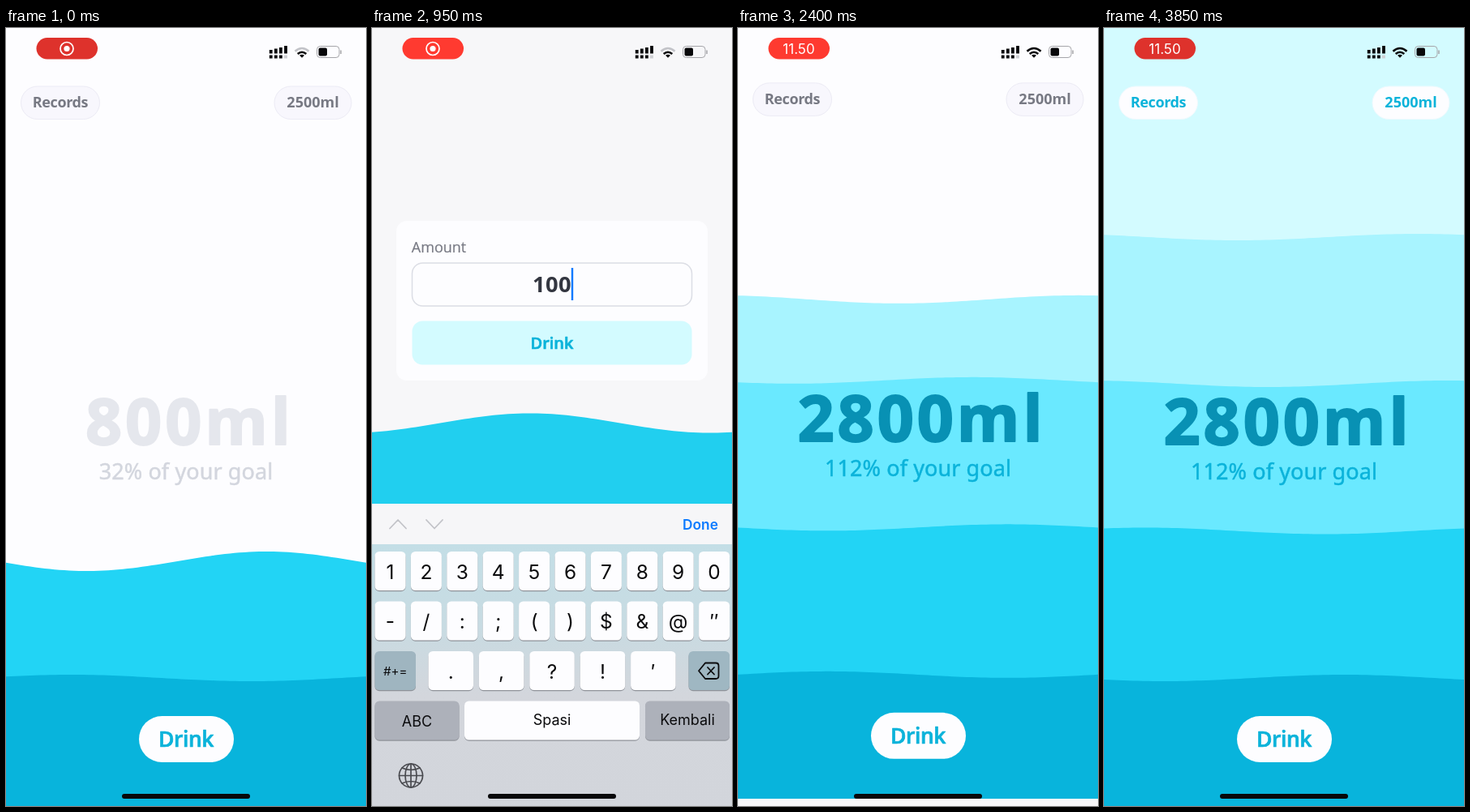
An HTML page for the animation above (3.9 s loop, 444 px wide and 960 px high).

```html
<!DOCTYPE html>
<html lang="en">
<head>
<meta charset="utf-8">
<title>Water tracker</title>
<style>
  html, body { margin: 0; width: 100%; height: 100%; overflow: hidden; background: #fdfdff; }
  svg { display: block; width: 444px; height: 960px; font-family: "Open Sans", "Noto Sans", sans-serif; }
  text { text-anchor: middle; stroke-linejoin: round; }
  .round { font-weight: 600; stroke: currentColor; fill: currentColor; stroke-width: .7; }
  .pill rect { fill: #f8f7fd; stroke: #ecebf5; }
  .pill text { fill: #777983; font-size: 18px; font-weight: 700; }
  .full .pill rect { fill: #fdfdff; stroke: #eefafe; }
  .full .pill text { fill: #0bb3da; }
  #total { font-size: 79px; font-weight: 700; letter-spacing: 4px; stroke-width: 2; color: #e5e7ed; }
  #share { font: 500 27px "Noto Sans", "Open Sans", sans-serif; letter-spacing: .1px; stroke-width: .5; color: #d3d6de; }
  .after #total { color: #0891b4; }
  .after #share { color: #0bb3da; }
  #keyboard, #clock { font-family: Inter, "Liberation Sans", sans-serif; }
  #keys text { font-size: 24.5px; fill: #0b0b0d; }
  #keys .word { font-size: 18px; }
  #keys .small { font-size: 15px; }
  .line { fill: none; stroke-linecap: round; stroke-linejoin: round; }
  #submit { fill: #d3fbff; }
  #submitText { color: #0bb3da; }
  #rim { fill: #a9c0c7; stroke: #cfd1d8; stroke-width: 1.4; visibility: hidden; }
  .pressed #rim { visibility: visible; }
  .pressed #submitText { color: #0892b4; }
</style>
</head>
<body>
<svg id="stage" viewBox="0 0 444 960">
  <defs>
    <linearGradient id="keysBg" x1="0" y1="0" x2="0" y2="1">
      <stop offset="0" stop-color="#c3dee6"/>
      <stop offset=".3" stop-color="#c8dbe2"/>
      <stop offset=".55" stop-color="#d3d6dc"/>
      <stop offset="1" stop-color="#d2d5db"/>
    </linearGradient>
  </defs>
  <rect width="444" height="960" fill="#fdfdff"/>

  <g id="page">
    <g id="waves"></g>
    <g class="pill">
      <rect x="18.5" y="72" width="97" height="40.5" rx="20.25"/>
      <text x="67" y="98" letter-spacing="-.4">Records</text>
    </g>
    <g class="pill">
      <rect x="331" y="72" width="95" height="40.5" rx="20.25"/>
      <text x="378.5" y="98">2500ml</text>
    </g>
    <text id="total" class="round" x="226.5" y="514"></text>
    <text id="share" class="round" x="222" y="557"></text>
    <rect x="164" y="849" width="117" height="57" rx="28.5" fill="#fdfdff"/>
    <text class="round" x="222" y="887" font-size="26.5" letter-spacing="-.4" color="#0bb3da">Drink</text>
  </g>
  <rect id="header" width="444" height="53" fill="#fdfdff"/>

  <g id="modal">
    <rect width="444" height="960" opacity=".025"/>
    <g id="card">
      <rect x="30" y="238" width="384" height="197" rx="13" fill="#fdfdff"/>
      <text class="round" x="82.5" y="276.5" font-size="18" style="font-weight:500;stroke-width:.2" color="#777983">Amount</text>
      <rect x="49.5" y="290" width="345" height="53" rx="13" fill="#fdfdff" stroke="#dcdee5" stroke-width="1.5"/>
      <text id="amount" x="222" y="325.5" font-size="27.3" font-weight="700" letter-spacing=".4" fill="#333640"></text>
      <rect id="caret" y="296" width="2.4" height="40" fill="#0a7aff"/>
      <rect id="submit" x="49.5" y="361.5" width="345" height="54" rx="13"/>
      <rect id="rim" x="46.5" y="358.5" width="351" height="60" rx="16"/>
      <text id="submitText" class="round" x="222" y="396" font-size="20">Drink</text>
    </g>
  </g>

  <g id="keyboard">
    <rect y="579" width="444" height="50" fill="#f6f6f8"/>
    <rect y="629" width="444" height="340" fill="url(#keysBg)"/>
    <path class="line" d="M22 609.5l10-10.5 10 10.5M67 599l10 10.5 10-10.5" stroke="#c2c3c8" stroke-width="1.8"/>
    <text x="405" y="611" font-size="17.3" font-weight="600" fill="#0a7aff">Done</text>
    <g id="keys"></g>
    <path class="line" d="M411 775.5h13q3.5 0 3.5 3.5v12.5q0 3.5-3.5 3.5h-13l-8-9.75zM414 781l8 8.5m0-8.5l-8 8.5" stroke="#0b0b0d" stroke-width="1.8"/>
    <g class="line" stroke="#4a4b50" stroke-width="1.7">
      <circle cx="48" cy="914.5" r="14.5"/>
      <ellipse cx="48" cy="914.5" rx="7" ry="14.5"/>
      <path d="M48 900v29M33.5 914.5h29M37 905q11 5 22 0M37 924q11-5 22 0"/>
    </g>
  </g>

  <g id="status">
    <rect id="badge" x="37.5" y="12" width="75.5" height="26.5" rx="13.25"/>
    <g id="record">
      <circle cx="75" cy="25.5" r="8" fill="none" stroke="#fff" stroke-width="1.7"/>
      <circle cx="75" cy="25.5" r="3.6" fill="#fff"/>
    </g>
    <text id="clock" x="75" y="31.5" font-size="17" fill="#fff">11.50</text>
    <path d="M326.700 27v4.500M332.800 25.500v6M338.900 24v7.500M345 22v9.500M326.700 33.500v4M332.800 33.500v4M338.900 33.500v4" stroke="#08080a" stroke-width="3.800"/>
    <path d="M345 33.500v4" stroke="#cfd0d4" stroke-width="3.800"/>
    <g class="line" stroke="#08080a" stroke-width="2.600" style="stroke-linecap:butt">
      <path id="arc" d="M356.500 28.800q8.500-7.600 17 0"/>
      <path d="M359.700 32q5.300-4.500 10.600 0"/>
      <path d="M362 33.800q3-2.200 6 0l-3 3z" fill="#08080a" stroke="none"/>
    </g>
    <rect x="383.500" y="22.500" width="27.500" height="14" rx="4" fill="none" stroke="#a6a6aa"/>
    <rect x="385.500" y="24.500" width="10.500" height="10" rx="2" fill="#08080a"/>
    <path d="M413 27.500v4.500" stroke="#a6a6aa" stroke-width="1.500"/>
  </g>
  <rect x="143" y="945" width="158" height="6" rx="3" fill="#08080a"/>
</svg>

<script>
const LOOP = 3900, W = 444;
const SUBMIT = 2150, CLOCK_ON = 1500, FULL = 2760;
const $ = id => document.getElementById(id);
const stage = $("stage");

function add(parent, name, attrs, label = "") {
  const el = document.createElementNS("http://www.w3.org/2000/svg", name);
  for (const k in attrs) el.setAttribute(k, attrs[k]);
  el.textContent = label;
  parent.append(el);
  return el;
}

// Piecewise linear track: [time, value] pairs.
function track(...keys) {
  return t => {
    const i = keys.findIndex(k => k[0] > t);
    if (i === 0) return keys[0][1];
    if (i < 0) return keys[keys.length - 1][1];
    const [t0, a] = keys[i - 1], [t1, b] = keys[i];
    return a + (b - a) * (t - t0) / (t1 - t0);
  };
}

const mix = (a, b, p) => `rgb(${a.map((v, i) => Math.round(v + (b[i] - v) * p))})`;

// Keyboard
function key(label, x, y, w, fill = "#fdfdff", cls = "", dy = 33.5) {
  add($("keys"), "rect", { x, y: y + 1.2, width: w, height: 48, rx: 5.5, fill: "#8f9299" });
  add($("keys"), "rect", { x, y, width: w, height: 48, rx: 5.5, fill });
  add($("keys"), "text", { x: x + w / 2, y: y + dy, class: cls }, label);
}
const row = (chars, x, y, w, step) => [...chars].forEach((c, i) => key(c, x + i * step, y, w));
row("1234567890", 3.5, 638, 38, 44.4);
row("-/:;()$&@″", 3.5, 699.5, 38, 44.4);
row(".,?!′", 69.5, 761, 55.5, 62.4);
key("#+=", 3.5, 761, 50.5, "#9fb5c0", "small", 30);
key("", 390.5, 761, 50.5, "#9fb7c2");
key("ABC", 3.5, 822.5, 104, "#adb1ba", "word", 31);
key("Spasi", 114, 822.5, 216, "#fdfdff", "word", 29);
key("Kembali", 337, 822.5, 104, "#adb1ba", "word", 29);

// Water layers, back to front: level, crest position and amplitude
const flat = track([0, 4]);
const layers = [
  { color: "#d3fbff", level: track([2300, 985], [2400, 620], [2500, 330], [2600, 130], [2750, 20], [2850, -30]),
    crest: track([2300, 300], [3900, 0]), amp: track([0, 12]) },
  { color: "#a8f4ff", level: track([2200, 985], [2300, 560], [2400, 339], [2460, 285], [2540, 258]),
    crest: track([2400, 420], [2950, 175], [3850, -57], [3900, -70]), amp: track([2400, 5], [2600, 4]) },
  { color: "#6ae9ff", level: track([2150, 985], [2230, 640], [2300, 490], [2390, 439]),
    crest: track([2400, 290], [2950, 190], [3850, -19], [3900, -31]), amp: flat },
  { color: "#22d4f5", level: track([2150, 658], [2350, 620.5]),
    crest: track([0, 322], [600, 243], [950, 195], [2100, 20], [2400, -112], [2950, -207], [3850, -394], [3900, -404]),
    amp: track([2150, 12], [2350, 4]) },
  { color: "#08b4dc", level: track([0, 802]),
    crest: track([0, 80], [600, 0], [2400, -334], [2950, -441], [3850, -593], [3900, -601]), amp: flat }
];
for (const l of layers) l.el = add($("waves"), "path", { fill: l.color });

function wave(level, crest, amp) {
  let d = "M0 1200";
  for (let x = 0; x <= W; x += 6)
    d += `L${x} ${(level - amp * Math.cos(2 * Math.PI * (x - crest) / W)).toFixed(2)}`;
  return d + `L${W} 1200Z`;
}

const keyboardHeight = track([680, 0], [750, 190], [850, 325], [950, 373], [1050, 381],
  [2150, 381], [2220, 190], [2300, 60], [2400, 9], [2470, 0]);
const modalAlpha = track([650, 0], [800, 1], [2150, 1], [2250, 0]);
const headerAlpha = track([2850, 1], [2950, .6], [3150, 0]);

const typing = [[0, "100"], [1200, "10"], [1300, "1"], [1400, ""], [1550, "2"],
  [1680, "20"], [1790, "200"], [1900, "2000"]];

function draw(t) {
  for (const l of layers) l.el.setAttribute("d", wave(l.level(t), l.crest(t), l.amp(t)));

  const kb = keyboardHeight(t), lift = Math.min(170.5, kb * .46);
  $("page").setAttribute("transform", `translate(0 ${-lift})`);
  $("keyboard").setAttribute("transform", `translate(0 ${381 - kb})`);
  $("card").setAttribute("transform", `translate(0 ${(170.5 - lift) * .84})`);
  $("modal").setAttribute("opacity", modalAlpha(t));
  $("header").setAttribute("opacity", headerAlpha(t));

  const after = t >= SUBMIT;
  stage.classList.toggle("after", after);
  stage.classList.toggle("full", t >= FULL);
  stage.classList.toggle("pressed", t >= 2050 && t < 2200);
  $("total").textContent = after ? "2800ml" : "800ml";
  $("share").textContent = (after ? "112" : "32") + "% of your goal";

  const value = typing.filter(k => k[0] <= t).pop()[1];
  $("amount").textContent = value;
  $("caret").setAttribute("x", 221.5 + value.length * 8.1);

  const glow = Math.min(1, 1.1 * (1 - Math.cos(4 * Math.PI * t / LOOP)));
  $("badge").setAttribute("fill", mix([222, 50, 44], [255, 58, 48], glow));
  const clock = t >= CLOCK_ON;
  $("record").setAttribute("visibility", clock ? "hidden" : "visible");
  $("clock").setAttribute("visibility", clock ? "visible" : "hidden");
  $("arc").setAttribute("stroke", clock ? "#08080a" : "#c2c3c8");
}

let start;
function tick(now) {
  start ??= now;
  draw((now - start) % LOOP);
  requestAnimationFrame(tick);
}
draw(0);
requestAnimationFrame(tick);
</script>
</body>
</html>
```
